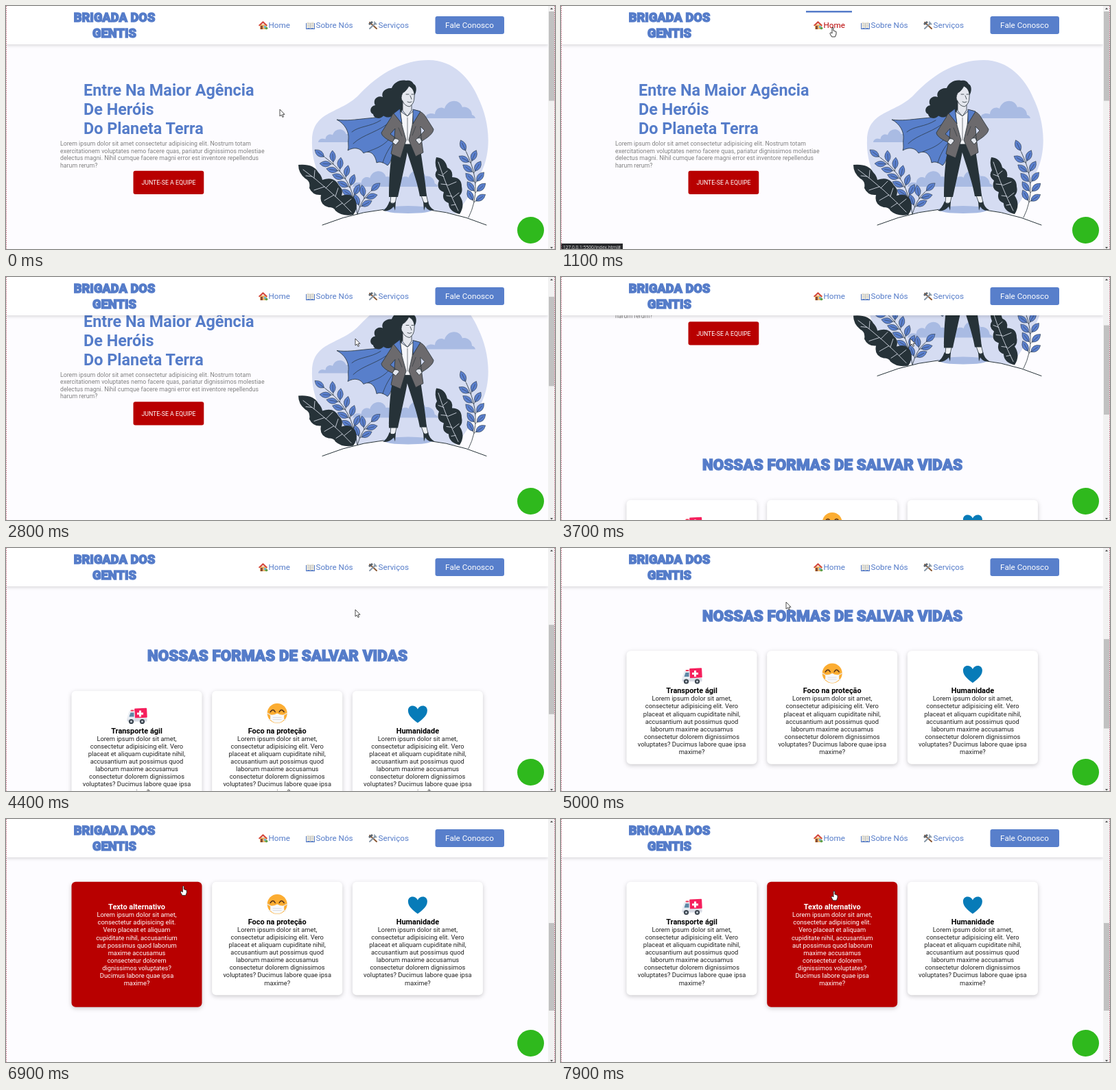
An HTML page for the animation above (8 s loop, 800x355 px).

```html
<!DOCTYPE html>
<html lang="pt-BR">
<head>
<meta charset="utf-8">
<style>
html, body { margin: 0; width: 100%; height: 100%; overflow: hidden; background: #fdfcff; }
svg { display: block; width: 800px; height: 355px; font: 9.36px Roboto, sans-serif; }
.display { font-weight: 900; fill: #557cc9; stroke: #557cc9; stroke-width: 1.4; }
.nav { font-size: 11.7px; fill: #557cc9; }
.ink { stroke: #263238; stroke-width: .8; stroke-linejoin: round; }
.mid { text-anchor: middle; }
.card { filter: drop-shadow(0 2px 3px #0003); }
.header { filter: drop-shadow(0 2px 2px #0002); }
</style>
</head>
<body>
<svg id="stage" viewBox="0 0 800 355"></svg>
<script>
const BLUE = '#557cc9', RED = '#b80000', DARK = '#263238', PALE = '#a9bbe3';
const NOTCH = 58.5;
const $ = id => document.getElementById(id);

const path = (d, fill, extra = '') => `<path d="${d}" fill="${fill}" ${extra}/>`;
const inked = (d, fill) => path(d, fill, 'class="ink"');
const line = (d, color, width = .8) =>
  path(d, 'none', `stroke="${color}" stroke-width="${width}" stroke-linecap="round"`);
const rect = (x, y, w, h, fill, r = 0, extra = '') =>
  `<rect x="${x}" y="${y}" width="${w}" height="${h}" rx="${r}" fill="${fill}" ${extra}/>`;
const oval = (x, y, rx, ry, fill) =>
  `<ellipse cx="${x}" cy="${y}" rx="${rx}" ry="${ry}" fill="${fill}"/>`;
const text = (x, y, s, extra = '') => `<text x="${x}" y="${y}" ${extra}>${s}</text>`;
const lines = (x, y, step, list, extra) =>
  list.map((s, i) => text(x, y + i * step, s, extra)).join('');

// Curved stem with paired leaves
function sprig(a, c, b, n) {
  const at = (u, k) => (1 - u) ** 2 * a[k] + 2 * u * (1 - u) * c[k] + u * u * b[k];
  let out = line(`M${a}Q${c} ${b}`, DARK);
  for (let i = 0; i <= n; i++) {
    const u = .25 + .75 * i / n, x = at(u, 0), y = at(u, 1);
    const dir = Math.atan2(at(u, 1) - at(u - .05, 1), at(u, 0) - at(u - .05, 0)) * 180 / Math.PI;
    for (const side of i < n ? [-42, 42] : [0])
      out += `<g transform="translate(${x} ${y}) rotate(${dir + side})">` +
        path('M3 0Q11 -9 20 0Q11 8 3 0Z', '#5b80cf', 'class="ink" style="stroke-width:.5"') +
        line('M0 0H15', DARK, .5) + '</g>';
  }
  return out;
}

function scenery() {
  const cloud = (x, y, s) => `<g transform="translate(${x} ${y}) scale(${s})">` +
    path('M0 0C1 -7 8 -8 14 -6C15 -16 24 -17 28 -14C32 -28 50 -29 54 -16C61 -18 68 -12 68 -5Q72 -4 73 0Z', PALE) + '</g>';
  const veins = '#e8edf8';
  return path('M616 79C652 79 676 106 688 134C703 164 709 206 694 240C685 262 672 284 655 304Q583 290 515 304C475 290 444 245 446 196C447 152 488 158 515 129C545 97 580 79 616 79Z', '#d5dcf2') +
    cloud(611, 164, 1) + cloud(455, 199, .75) + cloud(505, 264, .9) + cloud(560, 264, .95) +
    path('M461 320Q583 271 700 320L655 330H515Z', '#fdfcff') +
    line('M461 320Q583 271 700 320', DARK, 1) + oval(586, 297.5, 36, 5.5, PALE) +
    sprig([512, 304], [505, 250], [466, 222], 5) + sprig([512, 304], [518, 282], [530, 272], 2) +
    sprig([674, 309], [696, 265], [671, 214], 5) +
    path('M426 232Q448 230 455 243Q460 248 461 254Q478 248 485 262Q492 268 489 277Q503 272 509 283Q514 294 506 305Q490 308 480 299Q478 294 470 294Q456 290 459 276Q447 277 442 266Q444 256 436 252Q426 244 426 232Z', DARK) +
    line('M433 239Q472 268 503 301M449 251L450 240M446 249L437 248M466 266L476 256M464 264L449 269M480 278L484 266M478 276L464 284M493 290L503 282M490 288L481 294', veins) +
    path('M627 221Q640 222 643 236Q652 240 650 250Q664 250 664 264Q666 272 661 277Q670 290 661 304Q645 300 645 288Q634 284 638 272Q626 268 631 255Q622 248 628 240Q624 230 627 221Z', DARK) +
    line('M630 228Q642 265 659 299M637 246L643 241M638 249L630 246M644 262L656 257M643 261L634 260M651 280L660 273M650 278L642 277M655 290L649 291', veins);
}

function heroine() {
  return inked('M576 149C562 158 545 163 528 164C508 166 496 168 482 166C494 172 500 184 499 194C498 202 500 206 498 211C508 205 517 208 521 215C530 210 538 216 540 229C546 226 552 230 556 233C564 226 562 212 568 200L578 172Z', '#587fcb') +
    line('M562 167C545 184 520 187 506 201M562 190C550 206 538 208 527 213M546 167C530 177 515 175 504 184M564 200C555 212 551 222 549 229', DARK, .7) +
    // legs and shoes
    inked('M561 274L560 288L567 288L570 274ZM604 274L609 288L615 287L612 274Z', '#eceff3') +
    path('M567 196H587C586 215 577 250 571 279H558C558 252 560 218 567 196ZM583 196H602C606 225 611 255 613 278H603C599 255 590 232 583 208Z', DARK) +
    path('M559 285Q563 292 568 285L567 299L565 293Q558 301 549 299Q555 296 559 285ZM608 285Q612 291 615 285Q617 295 624 298Q616 301 611 293L609 299Z', DARK) +
    // hair and head
    path('M583 109C574 107 565 112 562 120C553 119 546 126 549 133C540 130 534 138 538 145C530 146 529 156 535 158C536 165 546 166 550 160C556 165 564 162 566 156C572 158 578 154 580 147L594 132C599 126 599 116 594 114C592 109 587 108 583 109Z', DARK) +
    inked('M578 138V153L585 161L591 152V143Z', '#e4e7ee') +
    inked('M578 127C582 125 585 121 587 117C592 119 596 125 595 133Q595 143 588 147Q581 146 578 139Q574 135 578 127Z', '#e4e7ee') +
    line('M583 129H587M591 129H594M589 131L591 136M585 140Q588 142 591 140', DARK) +
    // torso, jacket and arms
    inked('M575 154L585 161L594 153L600 202H570Z', '#f5f6fa') +
    inked('M574 152C567 154 563 157 561 163L547 185C547 190 556 196 566 200L569 194L560 187L567 179L566 192L561 216L575 222L583 196L577 174ZM594 152C603 153 608 156 611 161L623 180C623 186 614 193 603 199L600 193L610 182L604 176L605 192L608 214L597 220L587 196L592 174Z', '#6c6a6d') +
    inked('M566 194Q571 193 573 197L568 203L563 199ZM604 193Q599 192 597 196L602 202L606 198Z', '#e4e7ee') +
    inked('M574 150L577 172L565 157ZM593 151L604 154L593 172Z', '#587fcb') +
    line('M585 163V196M572 178L577 190M597 176L592 189', DARK, .6);
}

const icons = [
  rect(-3, -8, 18, 14, '#f5205d', 1, 'transform="rotate(-3)"') + rect(-14, 6, 29, 5, '#d7dce5', 1) +
    path('M-14 6L-11 -4H-3V8H-14Z', '#e9edf3') + path('M-11 4L-9 -2H-4V4Z', '#5d87a5') +
    rect(-9, -6, 5, 2, '#ef3757', 1) + rect(3.5, -5, 3, 9, '#fff') + rect(.5, -2, 9, 3, '#fff') +
    [-8, 8].map(x => oval(x, 11, 3.6, 3.6, '#3c4650') + oval(x, 11, 1.5, 1.5, '#c8d0d8')).join(''),
  oval(0, -1, 14.5, 14.5, '#fcad32') + line('M-10 -3Q-6 -9 -3 -3M3 -3Q6 -9 10 -3', '#5a351c', 1.6) +
    line('M-14 -1L-9 2M14 -1L9 2M-12 9L-8 7M12 9L8 7', '#e7e8ec', 1.3) +
    path('M-10 1Q-5 2 0 -1Q5 2 10 1V8Q6 13 0 13Q-6 13 -10 8Z', '#f7f8fb') +
    line('M-6 5H6M-6 8H6', '#d3d6dd'),
  path('M0 13C-5 9 -14 3 -14 -5C-14 -14 -3 -14 0 -7C3 -14 14 -14 14 -5C14 3 5 9 0 13Z', '#077bb8')
];
const titles = ['Transporte ágil', 'Foco na proteção', 'Humanidade'];
const body = ['Lorem ipsum dolor sit amet,', 'consectetur adipisicing elit. Vero', 'placeat et aliquam cupiditate nihil,',
  'accusantium aut possimus quod', 'laborum maxime accusamus', 'consectetur dolorem dignissimos',
  'voluptates? Ducimus labore quae ipsa', 'maxime?'];
const backBody = ['Lorem ipsum dolor sit amet,', 'consectetur adipisicing elit.', 'Vero placeat et aliquam',
  'cupiditate nihil, accusantium', 'aut possimus quod laborum', 'maxime accusamus', 'consectetur dolorem',
  'dignissimos voluptates?', 'Ducimus labore quae ipsa', 'maxime?'];

function card(title, i) {
  const x = 95.5 + i * 204.7, mid = x + 95;
  const front = rect(x, 501.3, 190, 165.5, '#fff', 6, 'class="card"') +
    `<g transform="translate(${mid} 535)">${icons[i]}</g>` +
    text(mid, 563, title, 'class="mid" font-size="10.95" font-weight="700"') +
    lines(mid, 574.3, 11.1, body, 'class="mid" fill="#222"');
  const back = rect(x, 501.3, 190, 183, RED, 6, 'class="card"') +
    '<g fill="#fff">' + text(mid, 541, 'Texto alternativo', 'class="mid" font-size="10.95" font-weight="700"') +
    lines(mid, 552.6, 11.15, backBody, 'class="mid"') + '</g>';
  return `<g id="front${i}">${front}</g><g id="back${i}">${back}</g>`;
}

const page = '<g id="page">' +
  lines(113, 131, 28.1, ['Entre Na Maior Agência', 'De Heróis', 'Do Planeta Terra'],
    `font-size="23.4" font-weight="700" fill="${BLUE}"`) +
  lines(79, 204, 10.53, ['Lorem ipsum dolor sit amet consectetur adipisicing elit. Nostrum totam',
    'exercitationem voluptates nemo facere quas, pariatur dignissimos molestiae',
    'delectus magni. Nihil cumque facere magni error est inventore repellendus',
    'harum rerum?'], 'font-size="8.78" fill="#808080"') +
  rect(185.5, 240.7, 102.8, 34.3, RED, 3) +
  text(237, 261, 'JUNTE-SE A EQUIPE', 'class="mid" font-size="8.78" fill="#fff"') +
  scenery() + heroine() +
  text(395.5, 457.5, 'NOSSAS FORMAS DE SALVAR VIDAS', 'class="display mid" font-size="22.5"') +
  titles.map(card).join('') + '</g>';

// Label, text x, hover bar x and width
const links = [['Home', 382.5, 357, 67], ['Sobre Nós', 451.5, 426, 90], ['Serviços', 542.5, 517, 81]];
const navIcons =
  path('M370 27H380V34H370Z', '#e9b66f') + path('M368 28L374.5 22L381 28L380 29.5L374.5 25L369 29.5Z', '#d4473c') +
  rect(371, 29, 3, 5, '#8a4b35') + rect(376, 29, 3, 3, '#6cb9dd') + oval(379.5, 32.5, 2, 1.7, '#5da04a') +
  path('M437 25H450V34H437Z', '#557cc9') + path('M438 24Q441 22 443.5 25Q446 22 449 24V33Q446 31 443.5 33Q441 31 438 33Z', '#eeeade') +
  line('M443.5 25V33M439.5 26H442M445 26H448M439.5 29H442M445 29H448', '#9aa1ae', .6) +
  line('M530 24L540 33', '#8b5a36', 2) + path('M528 26L533 22L535 24L530 28Z', '#5b646e') +
  line('M538.5 25L530 33', '#8798a8', 2) + line('M537 23V26.5H540', '#8798a8', 1.5);

const header = rect(0, 0, 790, 56, '#fff', 0, 'class="header"') +
  lines(158, 23, 23, ['BRIGADA DOS', 'GENTIS'], 'class="display mid" font-size="18.3"') +
  navIcons + links.map(([s, x, bx, w], i) => text(x, 32, s, `class="nav" id="link${i}"`) +
    rect(bx, 7, w, 2.5, BLUE, 0, `id="bar${i}"`)).join('') +
  rect(625.5, 15, 100.5, 26, '#587fcb', 3) +
  text(675.5, 32, 'Fale Conosco', 'class="mid" font-size="11.7" fill="#fff"');

const chrome = oval(764.5, 327.5, 19.5, 19.5, '#2fb91d') +
  `<g id="status">${rect(0, 347, 90, 8, '#292a2d')}` +
  text(3, 355, '127.0.0.1:5500/index.html#', 'font-size="6.6" fill="#ddd" font-family="Open Sans, sans-serif"') + '</g>' +
  rect(790, 0, 10, 355, '#f1f1f1') + rect(791, 8, 8, 130, '#c1c1c1', 0, 'id="thumb"') +
  path('M793 5L795 2.5L797 5ZM793 352L795 354.5L797 352Z', '#505050') +
  path('M.5 0V355M799.5 0V355', 'none', 'stroke="#c46a80" stroke-dasharray="1.5 1.5"') +
  '<g id="cursor">' +
  path('M0 0V10L2.3 8L4 11.5L5.5 10.8L4 7.3H7Z', '#fff', 'id="arrow" stroke="#222" stroke-width=".8"') +
  path('M-1 1Q0 -.8 1 1V5L5 6.5V10L3.5 14H-1.5L-4 9.5Q-4 7.5 -2.5 8L-1 9Z', '#fff', 'id="hand" stroke="#222" stroke-width=".9"') +
  '</g>';

$('stage').innerHTML = page + header + chrome;

// Pointer stops: time, x, y
const stops = [[0, 399, 151], [300, 399, 151], [900, 396, 31], [1200, 396, 31], [1500, 470, 28], [1900, 560, 30],
  [2300, 670, 30], [2700, 509, 90], [4400, 509, 90], [5000, 328, 79], [5400, 328, 79], [6100, 236, 95],
  [6700, 236, 95], [7300, 303, 103], [7700, 398, 105], [8000, 398, 105]];

function pointer(t) {
  const i = stops.findIndex(s => s[0] > t), [t0, x0, y0] = stops[i - 1], [t1, x1, y1] = stops[i];
  const u = (t - t0) / (t1 - t0);
  return [x0 + (x1 - x0) * u, y0 + (y1 - y0) * u];
}
const show = (id, on) => $(id).setAttribute('display', on ? 'inline' : 'none');

function draw(t) {
  const [x, y] = pointer(t), onNav = y < 42;
  // the wheel turns one notch every 400 ms
  const count = Math.max(0, Math.min(7, Math.floor((t - 2400) / 400)));
  const flipped = t >= 7300 ? 1 : t >= 6200 && t < 7200 ? 0 : -1;
  $('page').setAttribute('transform', `translate(0 ${-count * NOTCH})`);
  $('thumb').setAttribute('y', 8 + count * 20.85 - (flipped < 0 ? 0 : 2));
  $('thumb').setAttribute('height', flipped < 0 ? 130.5 : 128);
  for (let i = 0; i < 3; i++) {
    const [, , left, width] = links[i], hot = onNav && x >= left && x < left + width;
    show('bar' + i, hot);
    $('link' + i).style.fill = hot ? RED : BLUE;
    show('front' + i, i !== flipped);
    show('back' + i, i === flipped);
  }
  const hand = onNav || flipped >= 0 || t >= 6000 && t < 6200;
  show('hand', hand);
  show('arrow', !hand);
  show('status', t >= 1000 && t < 2700);
  $('cursor').setAttribute('transform', `translate(${x} ${y})`);
}

function tick(now) {
  draw(Math.floor(now % 8000 / 100) * 100);
  requestAnimationFrame(tick);
}
draw(0);
requestAnimationFrame(tick);
</script>
</body>
</html>
```
